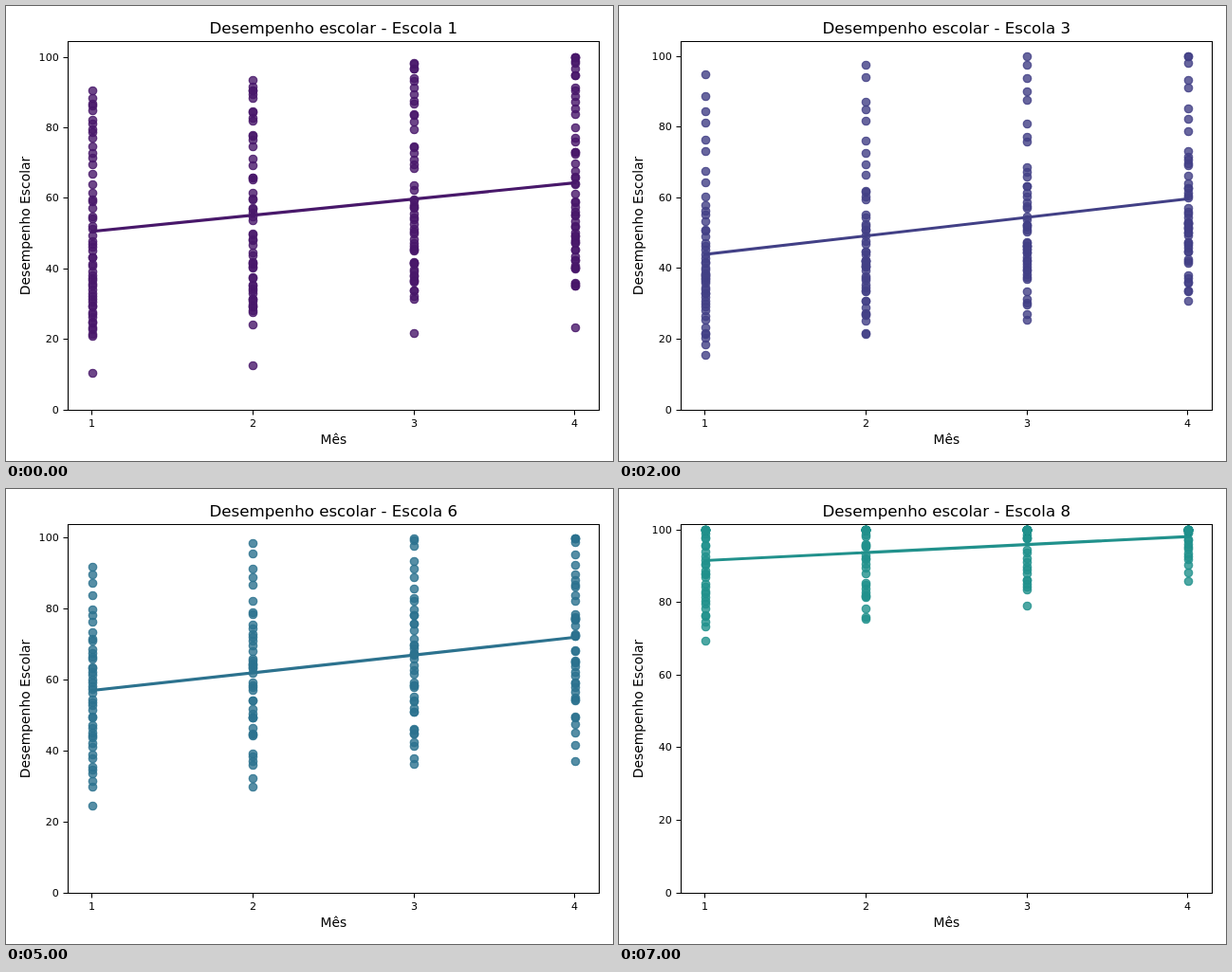
An HTML page that plays this animation: 640x480 px, repeating every 8000 ms.

```html
<!DOCTYPE html>
<html lang="pt">
<head>
<meta charset="utf-8">
<style>
  html, body { margin: 0; width: 100%; height: 100%; overflow: hidden; background: #fff; }
  svg { display: block; font-family: "DejaVu Sans", sans-serif; text-anchor: middle; }
  .title { font-size: 16.67px; }
  .label { font-size: 13.89px; }
  .tick { font-size: 11.11px; }
  .axis { fill: none; stroke: #000; stroke-width: 1.1; }
</style>
</head>
<body>
<svg id="chart" width="640" height="480" viewBox="0 0 640 480"></svg>
<script>
const HOLD = 1000, BASE = 426, HEIGHT = 388.5, MONTHS = [0, 1, 2, 3];
const GAIN = 4.7;    // mean rise per month
const WOBBLE = 2.5;  // random spread of that rise

// low: weakest pupil; keys: scores of the others in month 1 at evenly spaced ranks;
// trend: ends of the regression line.
const schools = [
  { color: "#48186a", pupils: 56, low: 10.4, keys: [20.9, 29, 36.6, 46, 58, 77, 90.5], trend: [50.6, 64.4] },
  { color: "#472d7b", pupils: 28, low: 26, keys: [28.7, 44, 50, 63, 76, 81, 96], trend: [63.2, 77.6] },
  { color: "#424086", pupils: 50, low: 15.6, keys: [18.5, 29, 36, 39.3, 47, 59.5, 95], trend: [44, 59.7] },
  { color: "#3b528b", pupils: 44, low: 20.35, keys: [27, 38, 46, 54, 61, 70, 90], trend: [54, 69] },
  { color: "#33638d", pupils: 52, low: 27.7, keys: [31.5, 43, 48.5, 54, 63, 75, 86.4], trend: [56.3, 71.8] },
  { color: "#2c728e", pupils: 44, low: 24.5, keys: [30, 41, 49, 57, 64, 73, 92], trend: [57, 72] },
  { color: "#26828e", pupils: 29, low: 12.3, keys: [18.7, 27.5, 39.8, 44.2, 65, 76, 97.2], trend: [52, 65.6] },
  { color: "#21918c", pupils: 36, low: 69.5, keys: [73.4, 80, 86, 91, 97, 103, 108], trend: [91.6, 98.2] },
];

let seed = 7;
const random = () => (seed = (seed * 16807) % 2147483647) / 2147483647;
const jitter = () => random() * 2 - 1;
const clamp = (v, min, max) => Math.min(max, Math.max(min, v));

const monthX = m => 90.5 + 169.8 * m;
const tickPixel = v => Math.floor(v) + 0.5;
const dotPixel = v => Math.round(v) + 0.5;

// Score at a rank from 0 to 1, linear between the key points.
function scoreAt(keys, rank) {
  const place = clamp(rank, 0, 1) * (keys.length - 1);
  const i = Math.min(Math.floor(place), keys.length - 2);
  return keys[i] + (keys[i + 1] - keys[i]) * (place - i);
}

function pupilScores({ pupils, low, keys }, i) {
  const last = pupils - 2;
  const start = i === 0 ? low
    : scoreAt(keys, i === 1 || i > last ? (i - 1) / last : (i - 1 + jitter() / 2) / last);
  return MONTHS.map(m => clamp(start + m * GAIN + (m && jitter() * WOBBLE), low, 100));
}

const text = (cls, x, y, content, extra = "") =>
  `<text class="${cls}" x="${x}" y="${y}" ${extra}>${content}</text>`;

function drawSchool(school, index) {
  const { color, pupils, low, trend } = school;
  // The axis ends 5% of the data range above 100.
  const toY = v => BASE - v * HEIGHT / (105 - 0.05 * low);
  let dots = "", ticks = "", labels = "";
  for (let i = 0; i < pupils; i++) {
    pupilScores(school, i).forEach((score, m) => {
      dots += `<circle cx="${dotPixel(monthX(m))}" cy="${dotPixel(toY(score))}" r="4.17"/>`;
    });
  }
  for (const m of MONTHS) {
    const x = tickPixel(monthX(m));
    ticks += `M${x} 426.5v5`;
    labels += text("tick", x, 444, m + 1);
  }
  for (let v = 0; v <= 100; v += 20) {
    const y = tickPixel(toY(v));
    ticks += `M65.5 ${y}h-5`;
    labels += text("tick", 55.8, y + 3.5, v, 'text-anchor="end"');
  }
  return `<g fill="${color}" stroke="${color}">
    <g fill-opacity=".8" stroke-opacity=".8" stroke-width="1.39">${dots}</g>
    <path d="M${monthX(0)} ${toY(trend[0])}L${monthX(3)} ${toY(trend[1])}"
      stroke-width="3.12" stroke-linecap="square"/></g>
    <path class="axis" d="M65.5 37.5h560v389h-560z${ticks}"/>${labels}` +
    text("title", 345.3, 29, `Desempenho escolar - Escola ${index + 1}`) +
    text("label", 345.3, 462, "Mês") +
    text("label", 0, 0, "Desempenho Escolar", 'transform="translate(25 232) rotate(-90)"');
}

const chart = document.getElementById("chart");
const pages = schools.map(drawSchool);
let shown = -1;

function tick() {
  const page = Math.floor(performance.now() / HOLD) % pages.length;
  if (page !== shown) chart.innerHTML = pages[shown = page];
  requestAnimationFrame(tick);
}
tick();
</script>
</body>
</html>
```
